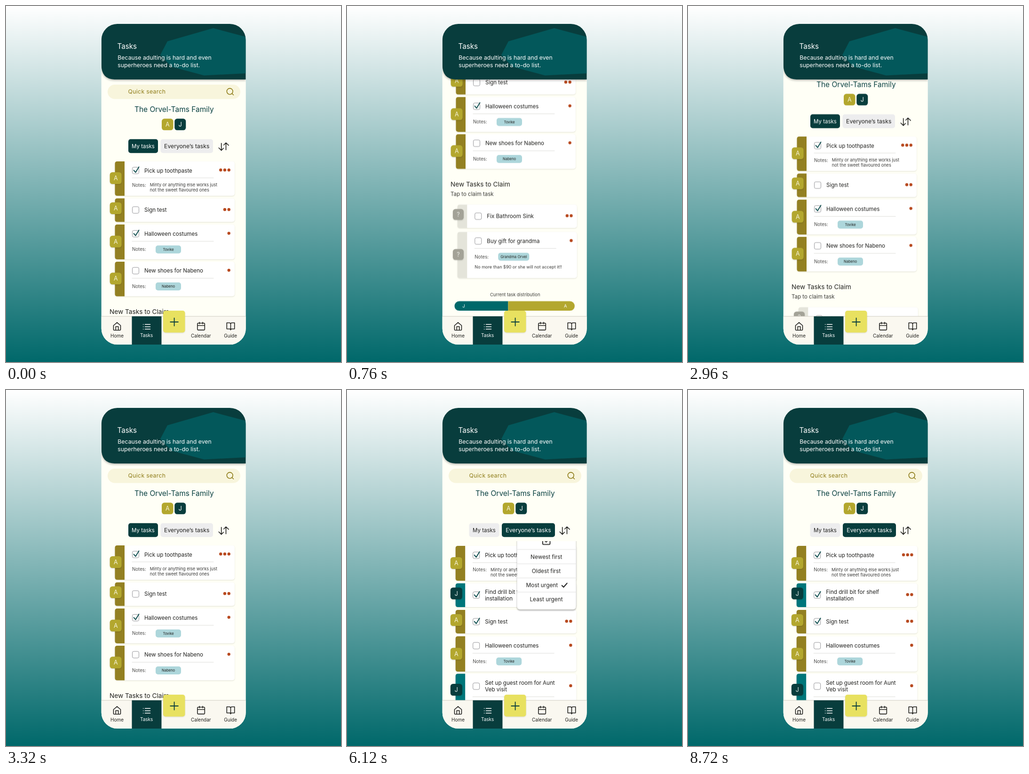
Animation, 712 px wide and 756 px high, one loop 9280 ms. Source, as an HTML page:

```html
<!DOCTYPE html>
<html lang="en">
<head>
<meta charset="utf-8">
<title>Tasks</title>
<style>
  html, body { margin: 0; width: 100%; height: 100%; overflow: hidden; }
  body { background: linear-gradient(#fff, #00686a); }
  svg { display: block; width: 712px; height: 756px; }
  text { font-family: Inter, Roboto, sans-serif; white-space: pre; }
  .line { fill: none; stroke-linecap: round; stroke-linejoin: round; }
  .card { filter: drop-shadow(0 1px 1px rgba(60, 60, 20, .16)); }
  .tag { filter: drop-shadow(0 1px 1px rgba(0, 0, 0, .18)); }
  .fab { filter: drop-shadow(0 1px 1px rgba(0, 0, 0, .12)); }
  .head { filter: drop-shadow(0 2px 2px rgba(0, 0, 0, .3)); }
  .sheet { filter: drop-shadow(0 2px 1.5px rgba(0, 0, 0, .35)); }
</style>
</head>
<body>
<svg id="stage" viewBox="0 0 712 756"></svg>
<script>
const LOOP = 9280, MOVE = 700, SCROLL = 289.5, MENU = 200;
const DARK = '#083d3d', TEAL = '#00686a', OLIVE = '#b3a72e', INK = '#20201e', RUST = '#b84a20';
const OWNER = {
  A: { strip: '#938022', tag: OLIVE, ink: '#f7f4dc' },
  J: { strip: '#00767a', tag: DARK, ink: '#e4efec' },
  '?': { strip: '#e4e4da', tag: '#a3a297', ink: '#eeeee8' }
};

const rect = (x, y, w, h, r, fill, more = '') =>
  `<rect x="${x}" y="${y}" width="${w}" height="${h}" rx="${r}" fill="${fill}" ${more}/>`;
const text = (x, y, size, str, fill = INK, anchor = 'start', more = '') =>
  `<text x="${x}" y="${y}" font-size="${size}" fill="${fill}" text-anchor="${anchor}" ${more}>${str}</text>`;
const mid = (x, y, size, str, fill) => text(x, y, size, str, fill, 'middle');
const line = (d, stroke = INK, width = 1.6) =>
  `<path class="line" d="${d}" stroke="${stroke}" stroke-width="${width}"/>`;
const rule = (x, y, w, stroke = '#dededa') => line(`M${x} ${y}h${w}`, stroke, 1);

function tag(cx, cy, size, who) {
  const o = OWNER[who];
  return rect(cx - size / 2, cy - size / 2, size, size, 5.5, o.tag, 'class="tag"') +
    mid(cx, cy + 4.5, 12.5, who, o.ink);
}

function check(x, cy, done) {
  return rect(x + .5, cy - 7, 14, 14, 3, '#fff', 'stroke="#96969a"') +
    (done ? line(`M${x + 3.5} ${cy - .5}l4 4.5l7-11.5`, '#0b4b4c', 1.9) : '');
}

function card(x, w, c) {
  const o = OWNER[c.who], left = x + 36.5;
  let s = rect(x, c.y, w, c.h, 5, '#fff', 'class="card"') +
    `<path d="M${x + 20.5} ${c.y}h-15.5q-5 0-5 5v${c.h - 10}q0 5 5 5h15.5z" fill="${o.strip}"/>` +
    tag(x + 1.7, c.tagY, c.who === '?' ? 23 : 25, c.who) + check(left, c.cy, c.done);
  const top = c.cy + 4.2 - (c.title.length - 1) * 7;
  c.title.forEach((t, i) => s += text(x + 62.5, top + i * 14.2, c.size || 11.55, t));
  for (let i = 0; i < c.dots; i++)
    s += `<circle cx="${x + w - 12.3 - i * 8.7}" cy="${c.cy - 1}" r="3.2" fill="${RUST}"/>`;
  if (c.rule) s += rule(left, c.cy + c.rule, 173);
  if (c.notes || c.chip) s += text(left, c.cy + (c.notes ? 34.3 : 36.8), 9.7, 'Notes:', '#4a4a48');
  (c.notes || []).forEach((t, i) => s += text(x + 74.3, c.cy + 33.5 + i * 11.4, 9.2, t, '#3a3a38'));
  if (c.chip) {
    const cw = c.chipW || 54;
    s += rect(x + 86.5, c.cy + 25, cw, 16.8, 5, '#add6db') +
      mid(x + 86.5 + cw / 2, c.cy + 36, cw > 54 ? 7.9 : 7.6, c.chip);
  }
  if (c.extra) s += text(left, c.cy + 58.5, 9.1, c.extra, '#3a3a38');
  return s;
}

const tooth = { who: 'A', done: 1, title: ['Pick up toothpaste'], dots: 3, rule: 15.7,
  notes: ['Minty or anything else works just', 'not the sweet flavoured ones'] };
const sign = { who: 'A', title: ['Sign test'], dots: 2 };
const costumes = { who: 'A', title: ['Halloween costumes'], dots: 1, rule: 16, chip: 'Tovike' };

const mine = [
  { ...tooth, y: 330, h: 73, tagY: 365.5, cy: 349.3 },
  { ...sign, y: 408.5, h: 50, tagY: 429.5, cy: 433.2 },
  { ...costumes, done: 1, y: 464, h: 74, tagY: 500.3, cy: 483.6 },
  { who: 'A', title: ['New shoes for Nabeno'], dots: 1, rule: 16, chip: 'Nabeno', y: 543, h: 73.5, tagY: 578.8, cy: 562.1 }
];
const open = [
  { who: '?', title: ['Fix Bathroom Sink'], dots: 2, size: 11.7, y: 692.5, h: 49.5, tagY: 713.3, cy: 717 },
  { who: '?', title: ['Buy gift for grandma'], dots: 1, size: 11.6, rule: 15.8, chip: 'Grandma Orvel', chipW: 66,
    extra: 'No more than $90 or she will not accept it!!', y: 750.5, h: 98, tagY: 798.3, cy: 769.7 }
];
const everyone = [
  { ...tooth, y: 331, h: 74, tagY: 367.5, cy: 351 },
  { who: 'J', done: 1, title: ['Find drill bit for shelf', 'installation'], dots: 2, y: 410.5, h: 50.5, tagY: 432, cy: 435.5 },
  { ...sign, done: 1, y: 467, h: 50, tagY: 488.5, cy: 492 },
  { ...costumes, y: 523, h: 75, tagY: 560, cy: 543 },
  { who: 'J', title: ['Set up guest room for Aunt', 'Veb visit'], dots: 1, rule: 22.5, y: 602.5, h: 75, tagY: 636.5, cy: 629 }
].map(c => ({ ...c, size: 11.65 }));

const tab = (x, w, on, label, size) =>
  rect(x, 282.7, w, 29.6, 5, on ? DARK : '#ededee') + mid(x + w / 2, 301.5, size, label, on ? '#fff' : INK);
const tabs = all => all
  ? tab(259.5, 64, 0, 'My tasks', 11.5) + tab(329, 113, 1, 'Everyone’s tasks', 12.2)
  : tab(260, 63, 1, 'My tasks', 11.5) + tab(328.5, 111.5, 0, 'Everyone’s tasks', 12.2);

const common =
  rect(216, 167, 282, 30.5, 15.2, '#f8f5dc') +
  text(259.5, 186.3, 12.3, 'Quick search', '#8f7d1a', 'start', 'letter-spacing=".3"') +
  `<circle cx="475.7" cy="181.3" r="6.4" fill="none" stroke="#8f7d1a" stroke-width="1.6"/>` +
  line('M480.5 186l3 3', '#8f7d1a') +
  mid(357.3, 224.8, 15.5, 'The Orvel-Tams Family', '#0a4142') +
  rect(331, 239.3, 24.5, 24.5, 5.5, OLIVE) + mid(343.2, 256, 12.5, 'A', '#f7f4dc') +
  rect(358.3, 239.3, 24, 24.5, 5.5, DARK) + mid(370.3, 256, 12.5, 'J', '#fff') +
  line('M457.7 291.5v15M452.3 301.2l5.4 5.4l4.6-4.6M467.5 305.5v-15M462.8 295.3l4.7-4.8l5.6 5.4');

const claim =
  text(220, 653.6, 13.65, 'New Tasks to Claim') + text(220, 674.3, 11.5, 'Tap to claim task', '#3a3a38') +
  open.map(c => card(234.8, 254, c)).join('') +
  mid(357.2, 886.9, 9.35, 'Current task distribution', '#3a3a38') +
  `<path d="M342.5 897.5h-103.8a10.25 10.25 0 0 0 0 20.5h103.8z" fill="${TEAL}"/>` +
  `<path d="M342.5 897.5h131.2a10.25 10.25 0 0 1 0 20.5h-131.2z" fill="${OLIVE}"/>` +
  mid(248, 911.2, 9.5, 'J', '#fff') + mid(464.3, 911.2, 9.5, 'A', '#fff');

const header =
  `<path class="head" d="M202.700 38h307v118h-279q-28-1-28-31z" fill="${DARK}"/>` +
  `<path d="M343 75L440.500 47L509.700 65.500V143L421 147.500L352 129L328 104z" fill="#03585b"/>` +
  text(236.5, 91.3, 15.2, 'Tasks', '#fff') +
  text(237.3, 113.6, 12.3, 'Because adulting is hard and even', '#fff') +
  text(237.3, 129.9, 12.3, 'superheroes need a to-do list.', '#fff');

const nav =
  rect(202, 659, 308, 60, 0, '#faf8f0') + rule(202, 659, 308, '#cfccc2') +
  rect(267.5, 659, 63, 60, 0, DARK) +
  line('M228.500 678.500l7.500-6.300l7.500 6.300v8.500q0 1.500-1.500 1.500h-12q-1.500 0-1.500-1.500zM233.300 688v-7.300h5.400v7.300') +
  line('M295.500 676.300h11M295.500 681.300h11M295.500 686.300h11M291.700 676.300h.1M291.700 681.300h.1M291.700 686.300h.1', '#fff') +
  line('M408.500 673.500h12.200q1.600 0 1.600 1.600v11.400q0 1.600-1.600 1.600h-12.200q-1.600 0-1.600-1.600v-11.400q0-1.600 1.600-1.600zM407 678.500h15.300M411.200 671.500v3.500M418 671.500v3.500') +
  line('M477.500 675.500q0-2.800-3-2.800h-5.200v13h5.800q2.400 0 2.400 2.400q0-2.400 2.400-2.400h5.800v-13h-5.200q-3 0-3 2.800v12') +
  mid(236, 704, 10, 'Home') + mid(298.7, 703.3, 10, 'Tasks', '#fff') +
  mid(414.3, 704, 10, 'Calendar') + mid(477.2, 704, 10, 'Guide') +
  rect(334, 647, 46.5, 46.5, 5, '#e8e160', 'class="fab"') +
  line('M349.300 671h16.600M357.600 662.700v16.600', DARK, 1.8);

const menu =
  rect(361.5, 312, 125, 202.5, 6, '#fff', 'class="sheet"') +
  [351.5, 387, 417.5, 447.5, 477.5].map(y => rule(362, y, 124, '#e2e2e0')).join('') +
  mid(423.3, 340.6, 12, 'All') +
  line('M431.500 368.500v6q0 1.800-1.800 1.800h-12q-1.800 0-1.800-1.800v-11.800q0-1.800 1.800-1.800h9M420 368l3.300 3.400l8.700-8.900', INK, 1.8) +
  mid(423.7, 406.6, 11.85, 'Newest first') + mid(423.5, 437, 11.85, 'Oldest first') +
  mid(414.4, 467, 11.85, 'Most urgent') + mid(423.5, 497, 11.85, 'Least urgent') +
  line('M456.700 463.500l3.600 3.500l7.500-8.300', '#111', 1.9);

document.getElementById('stage').innerHTML = `
  <defs>
    <clipPath id="phone"><rect x="202.700" y="38" width="307" height="681" rx="34"/></clipPath>
    <clipPath id="drop"><rect x="350" y="321" width="150" height="210"/></clipPath>
  </defs>
  <g clip-path="url(#phone)">
    ${rect(202, 38, 308, 681, 0, '#fffff6')}
    <g id="page">
      ${common}
      <g id="mine">${tabs(0)}${mine.map(c => card(231.5, 254.5, c)).join('')}${claim}</g>
      <g id="all">${tabs(1)}${everyone.map(c => card(230.7, 257, c)).join('')}</g>
    </g>
    <g clip-path="url(#drop)"><g id="menu">${menu}</g></g>
    ${header}${nav}
  </g>`;

// Each step: [time in ms, value, easing towards the next step]
function run(id, prop, steps) {
  const frames = steps.map(([t, value, easing = 'linear']) => ({ offset: t / LOOP, [prop]: value, easing }));
  document.getElementById(id).animate(frames, { duration: LOOP, iterations: Infinity });
}
const shift = y => `translateY(${y}px)`;
const swap = (a, b) => [[0, a], [4120, a], [4120, b], [LOOP, b]];
const move = (a, b, there, back) => [
  [0, shift(a)],
  [there, shift(a), 'ease'], [there + MOVE, shift(b)],
  [back, shift(b), 'ease'], [back + MOVE, shift(a)],
  [LOOP, shift(a)]
];

run('page', 'transform', move(0, -SCROLL, 280, 2600));
run('mine', 'opacity', swap(1, 0));
run('all', 'opacity', swap(0, 1));
run('menu', 'transform', move(-MENU, 0, 5800, 7720));
</script>
</body>
</html>
```
